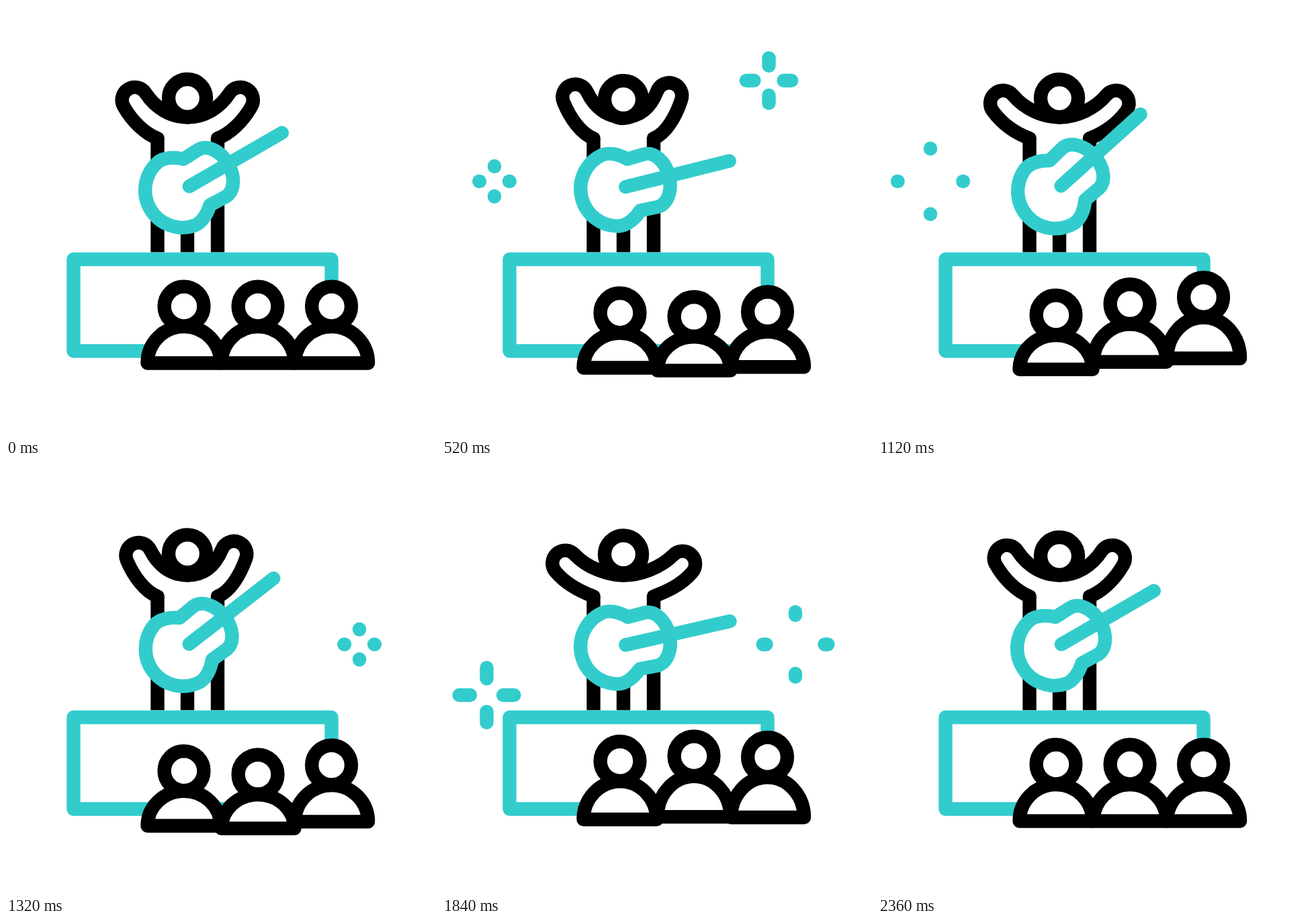
An HTML page for the animation above (2.44 s loop, 640 by 640 pixels).

```html
<!DOCTYPE html>
<html lang="en">
<head>
<meta charset="utf-8">
<title>Concert</title>
<style>
  html, body { margin: 0; width: 100%; height: 100%; overflow: hidden; background: #fff; }
  svg { display: block; width: 100vw; height: 100vh; }
  .ink, .teal { fill: none; stroke: #000; stroke-width: 20.4; stroke-linecap: round; stroke-linejoin: round; }
  .teal { stroke: #33cccc; }
  .solid { fill: #fff; }
</style>
</head>
<body>
<svg viewBox="0 0 640 640">
  <path class="ink" style="stroke-linecap:butt" d="M225.5 197V366.5M270 300V366.5M315 197V366.5"/>
  <path class="ink" id="armL"/>
  <path class="ink" id="armR" transform="matrix(-1 0 0 1 540.5 0)"/>
  <circle class="ink solid" id="head" cx="270" cy="137" r="28"/>
  <g id="guitar">
    <path class="teal solid" d="M16-39.5L42-40.5A28 40.5 0 0 1 42 40.5L16 39.5C6 49-8 56.5-20 54.3A55.5 55.5 0 0 1-20-54.3C-8-56.5 6-49 16-39.5Z"/>
    <path class="teal" d="M3.3 0H162.5"/>
  </g>
  <rect class="teal" x="100.5" y="377" width="384" height="136.5"/>
  <g id="crowd"></g>
  <g id="stars"></g>
</svg>
<script>
const LOOP = 2440, LAST = 2360, STEP = 40;
const $ = id => document.getElementById(id);

const clamp = u => Math.min(1, Math.max(0, u));
const ease = u => (1 - Math.cos(Math.PI * clamp(u))) / 2;

// Eased value at time t from a list of [time, value] keys.
function track(keys, t) {
  if (t <= keys[0][0]) return keys[0][1];
  for (let i = 1; i < keys.length; i++) {
    const [t0, a] = keys[i - 1], [t1, b] = keys[i];
    if (t < t1) return a + (b - a) * ease((t - t0) / (t1 - t0));
  }
  return keys[keys.length - 1][1];
}

// Rest, swing between a and b twice, rest again.
const swing = (start, a, b) =>
  [0, a, b, a, b, 0].map((v, i) => [start + 400 * i, v]);

function add(parent, tag, cls) {
  const el = document.createElementNS("http://www.w3.org/2000/svg", tag);
  el.setAttribute("class", cls);
  return parent.appendChild(el);
}

const armKeys = { armL: swing(200, -8.1, 10.6), armR: swing(200, -12.6, 11.9) };
const headKeys = [[240, 0], [800, 4.2], [1500, -5], [2200, 0]];
const guitarKeys = [[100, 0], [640, -18.1], [1180, 13], [1720, -19.5], [2260, 0]];

const crowd = [265, 375, 484.5].map((x, i) => {
  const body = add($("crowd"), "path", "ink solid");
  const head = add($("crowd"), "circle", "ink solid");
  head.setAttribute("cx", x);
  head.setAttribute("r", 29.4);
  return { x, body, head, keys: swing(160 * i, 15.8, -13.5) };
});

const stars = [[486.5, 111, 0], [78, 261, 200], [526, 268.5, 1000], [66.5, 344, 1200]]
  .map(([x, y, delay]) => ({ x, y, delay, el: add($("stars"), "path", "teal") }));

// Left arm: the hand turns about the shoulder, both ends stay put.
function armPath(deg) {
  const a = -deg * Math.PI / 180, c = Math.cos(a), s = Math.sin(a);
  const p = (x, y) => {
    const dx = x - 230, dy = y - 190;
    return `${230 + dx * c - dy * s} ${190 + dx * s + dy * c} `;
  };
  return `M225.5 197C207 190 ${p(188, 172)}${p(175.5, 150)}` +
    `A19 19 0 0 1 ${p(208, 130)}C${p(222, 151.5)}245 165.5 270.25 165.5`;
}

function drawFan({ x, body, head, keys }, t) {
  const d = track(keys, t);
  const base = 531.5 + d * (d > 0 ? 0.72 : 0.52);
  head.setAttribute("cy", 447 + d);
  body.setAttribute("d",
    `M${x - 54.5} ${base}A54.5 ${base - 477 - d} 0 0 1 ${x + 54.5} ${base}Z`);
}

function drawStar({ x, y, delay, el }, t) {
  const age = t - delay;
  const near = 22 + 27 * ease((age - 560) / 400);
  const far = 22 + 27 * ease(clamp((age - 280) / 640) ** 0.8);
  const on = age > 280 && age < 960;
  el.setAttribute("d", !on ? "" : [[1, 0], [-1, 0], [0, 1], [0, -1]].map(([u, v]) =>
    `M${x + u * near} ${y + v * near}L${x + u * far} ${y + v * far}`).join(""));
}

function draw(now) {
  const t = Math.min(LAST, Math.floor((now % LOOP) / STEP) * STEP);
  for (const id in armKeys) $(id).setAttribute("d", armPath(track(armKeys[id], t)));
  $("head").setAttribute("cy", 137 + track(headKeys, t));
  $("guitar").setAttribute("transform",
    `translate(270 270) rotate(${-30 - track(guitarKeys, t)})`);
  crowd.forEach(fan => drawFan(fan, t));
  stars.forEach(star => drawStar(star, t));
}

function tick() {
  draw(performance.now());
  requestAnimationFrame(tick);
}
tick();
</script>
</body>
</html>
```
